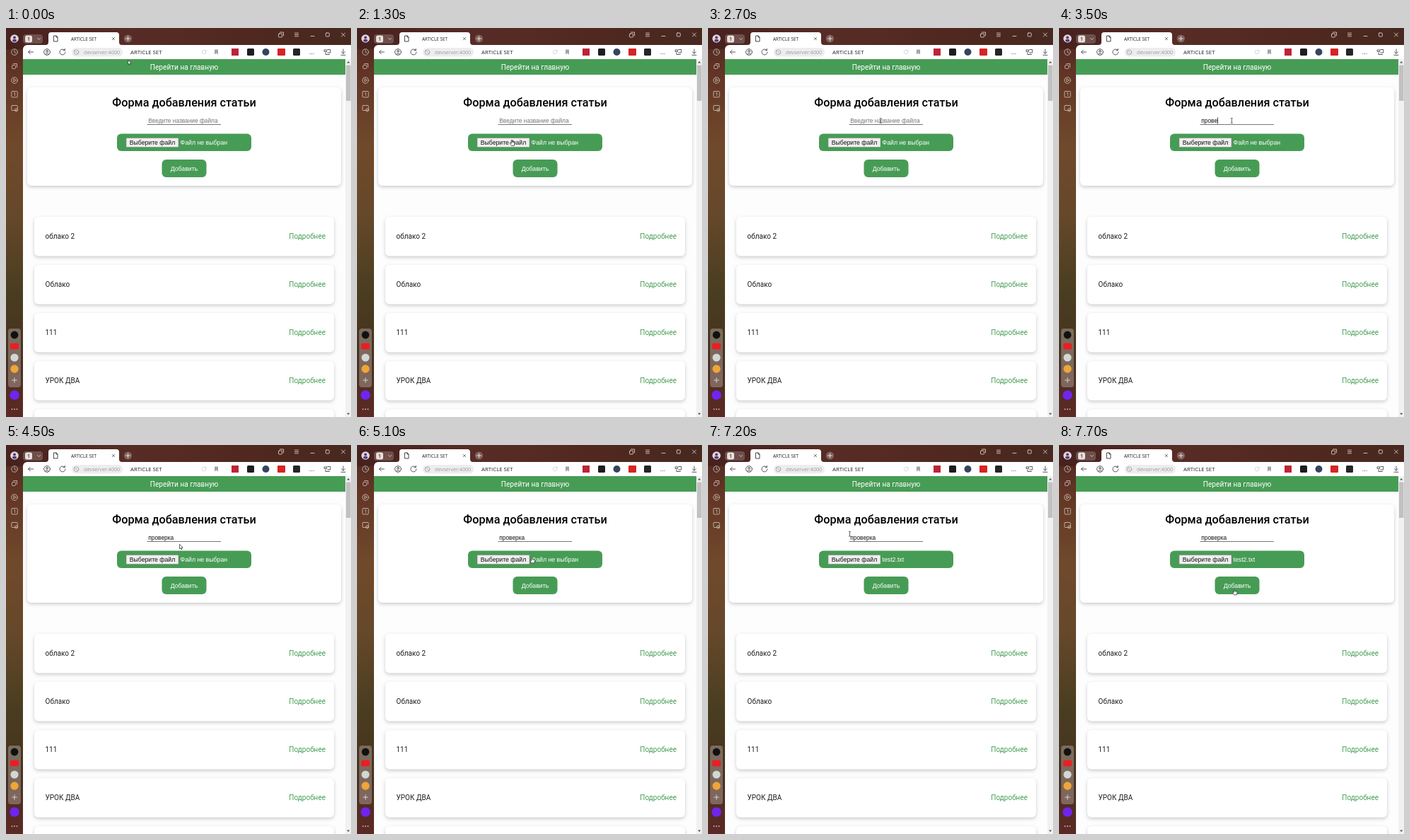
These frames come from a looping animation (488 px wide and 550 px high, 8 s). An HTML page:

```html
<!DOCTYPE html>
<html lang="ru">
<head>
<meta charset="utf-8">
<title>Форма</title>
<style>
  html, body { margin: 0; width: 100%; height: 100%; overflow: hidden; background: #fdfdfd; }
  svg { display: block; }
  text { white-space: pre; }
  .roboto { font-family: Roboto, sans-serif; }
  .arial { font-family: "Liberation Sans", Arial, sans-serif; }
  .ui { font-family: "Open Sans", sans-serif; }
  .line { fill: none; stroke-width: .9; stroke-linecap: round; stroke-linejoin: round; }
  .card { fill: #fff; filter: drop-shadow(0 2.5px 2.5px rgba(40, 45, 65, .24)); }
</style>
</head>
<body>
<svg id="stage" width="488" height="550" viewBox="0 0 488 550">
  <defs>
    <linearGradient id="side" x2="0" y2="1">
      <stop offset="0" stop-color="#4c2521"/>
      <stop offset=".12" stop-color="#623525"/>
      <stop offset=".3" stop-color="#70492b"/>
      <stop offset=".48" stop-color="#66482a"/>
      <stop offset=".68" stop-color="#493d20"/>
      <stop offset=".86" stop-color="#48301f"/>
      <stop offset="1" stop-color="#5c2924"/>
    </linearGradient>
    <linearGradient id="top">
      <stop offset="0" stop-color="#46211e"/>
      <stop offset=".35" stop-color="#582c26"/>
      <stop offset=".7" stop-color="#50281f"/>
      <stop offset="1" stop-color="#47291f"/>
    </linearGradient>
  </defs>
  <g id="scene"></g>
  <g id="field"></g>
  <rect id="caret" y="126.5" width=".8" height="9" fill="#111"/>
  <g id="cursor" stroke="#222" stroke-width=".7" stroke-linejoin="round">
    <path data-shape="arrow" fill="#fff" d="M0 0V6.6L1.5 5.2 2.5 7.5 3.6 7 2.6 4.8H4.7Z"/>
    <path data-shape="hand" fill="#fff" d="M-.7 .6Q0-.4 .7.6V3.2L3.6 3.9Q4.2 4.2 4 5.2L3.3 8.4H-.5L-2.7 5.2Q-2.6 4-1.6 4.6L-.7 5.3Z"/>
    <path data-shape="beam" fill="none" d="M-1.5-3.4H-.4L0-3 .4-3.4H1.5M0-3V3M-1.5 3.4H-.4L0 3 .4 3.4H1.5"/>
  </g>
</svg>
<script>
const GREEN = '#479c55';
const LOOP = 8000, STEP = 100;
const $ = id => document.getElementById(id);

const rect = (x, y, w, h, fill, r = 0, more = '') =>
  `<rect x="${x}" y="${y}" width="${w}" height="${h}" rx="${r}" fill="${fill}" ${more}/>`;
const dot = (x, y, r, fill) => `<circle cx="${x}" cy="${y}" r="${r}" fill="${fill}"/>`;
const line = (d, color) => `<path class="line" d="${d}" stroke="${color}"/>`;
const ring = (x, y, r, color) => `<circle class="line" cx="${x}" cy="${y}" r="${r}" stroke="${color}"/>`;
const frame = (x, y, w, h, color) =>
  `<rect class="line" x="${x}" y="${y}" width="${w}" height="${h}" rx="1" stroke="${color}"/>`;
const label = (str, x, mid, size, fill, font, anchor = 'start', weight = 400) =>
  `<text class="${font}" x="${x}" y="${mid + size * .355}" font-size="${size}" fill="${fill}" text-anchor="${anchor}" font-weight="${weight}">${str}</text>`;
const card = (x, y, w, h) => `<rect class="card" x="${x}" y="${y}" width="${w}" height="${h}" rx="6"/>`;
const copyIcon = (x, y, c) => frame(x - 3.5, y - 1.5, 5, 5, c) + line(`M${x - 1.5} ${y - 3.5}h5v5`, c);

function sidebar() {
  const c = '#c9b8ae';
  return rect(0, 0, 24, 550, 'url(#side)') + rect(0, 0, 488, 30, 'url(#top)') +
    dot(12, 15, 5.8, '#e6d5df') + dot(12, 13.6, 2, '#4d3d73') + rect(9, 16, 6, 3.5, '#4d3d73', 1.7) +
    ring(12, 34, 4.3, c) + line('M12 31.5V34.3L14 35.3', c) +
    copyIcon(12, 54, c) +
    ring(12, 74, 4.3, c) + line('M10.8 72V76L14 74Z', c) +
    frame(7.8, 89.5, 8.4, 8.4, c) + label('1', 12, 93.8, 6.5, '#eee', 'ui', 'middle') +
    frame(7.8, 109.5, 8.4, 7, c) + ring(14.5, 116, 2, c) +
    rect(3, 425, 18, 83, 'rgba(255,255,255,.27)', 4) +
    dot(12, 434, 5.4, '#111') + rect(6, 445.8, 12, 8.4, '#ed1c24', 2) +
    dot(12, 466, 5.6, '#d4d6d4') + dot(12, 482, 5.7, '#f0a536') +
    line('M8.7 498h6.6M12 494.7v6.6', '#ddd') +
    dot(12, 519, 6.8, '#6f25ee') +
    [8.5, 12, 15.5].map(x => dot(x, 539, .9, '#ccb9b1')).join('');
}

function tabs() {
  const c = '#d9cbc6';
  return rect(24, 9, 28, 13, 'rgba(255,255,255,.2)', 4) +
    rect(27, 10.5, 10, 10, '#e8dfdc', 2.5) + label('1', 32, 15.4, 7, '#4a2a26', 'ui', 'middle', 600) +
    line('M44.5 14.5L46.5 16.5 48.5 14.5', c) +
    '<path d="M24 30a6 6 0 0 1 6-6H56Q60 24 60 20V10Q60 6 64 6H156Q160 6 160 10V20Q160 24 164 24H488V44H24Z" fill="#fff"/>' +
    line('M67.8 11h3.2l2 2v6h-5.2ZM71 11v2h2', '#333') +
    label('ARTICLE SET', 92, 15.3, 6.3, '#222', 'ui') +
    line('M150.2 13.4l3.4 3.4M153.6 13.4l-3.4 3.4', '#666') +
    dot(172.5, 15, 5.6, 'rgba(255,255,255,.25)') + line('M169.6 15h5.8M172.5 12.1v5.8', '#eee') +
    copyIcon(389, 9.5, c) + line('M408.5 7.2h5M408.5 9.5h5M408.5 11.8h5', c) +
    line('M431 11.5h5', c) + frame(452.3, 7, 5, 5, c) + line('M474.5 7l5 5M479.5 7l-5 5', c);
}

function toolbar() {
  const c = '#444';
  return line('M38.5 34h-7M34.3 31.2L31.5 34l2.8 2.8', c) +
    ring(58, 34, 4.4, c) + ring(58, 32.8, 1.4, c) + line('M55.5 37q2.5-2.6 5 0', c) +
    line('M83 31.3A4 4 0 1 0 84 34M83.3 29.4v2.3H81', c) +
    rect(93, 28, 72, 12.5, '#ededed', 6) +
    ring(99.5, 34.2, 3.4, '#a5a5a5') + line('M97.2 32l4.6 4.6', '#a5a5a5') +
    label('devserver:4000', 110, 34.2, 7.2, '#999', 'ui') +
    label('ARTICLE SET', 176, 34.2, 7.8, '#222', 'ui') +
    ring(280, 34, 2.8, '#d5d5d5') + line('M282 31.5h2', '#d5d5d5') +
    '<path d="M295 30.6h5v7l-2.5-2-2.5 2Z" fill="#a2a2a8"/>' +
    rect(319, 29, 10, 10, '#bd2436') + rect(341, 29, 10, 10, '#1d1d1d', 1.5) +
    dot(367.5, 34, 5, '#35445f') + rect(384, 29, 11, 10, '#d72424', 1) +
    rect(406, 29, 10, 10, '#252525', 1.5) +
    [430, 432.5, 435].map(x => dot(x, 36.5, .6, c)).join('') +
    line('M450.5 31h3.2v2.4h-3.2ZM454.8 30.5h4v4.5h-4M452 35v2.5h5.5', c) +
    line('M477 30v6M474.5 33.7l2.5 2.5 2.5-2.5M474 38.3h6', c);
}

function page() {
  const titles = ['облако 2', 'Облако', '111', 'УРОК ДВА', ''];
  const rows = titles.map((title, i) => {
    const y = 267 + i * 68, link = title ? 'Подробнее' : '';
    return card(40, y, 424, 55.5) + label(title, 55.5, y + 27.5, 10, '#1c1c1c', 'roboto') +
      label(link, 452, y + 27.5, 10, GREEN, 'roboto', 'end');
  }).join('');
  return rect(24, 44, 464, 506, '#fdfdfd') + rect(24, 44, 456, 22, GREEN) +
    label('Перейти на главную', 252, 55.3, 10.1, '#fff', 'roboto', 'middle') +
    card(30, 84, 444, 139) +
    label('Форма добавления статьи', 252, 105, 16.2, '#000', 'roboto', 'middle', 500) +
    rect(199.5, 136, 104.5, .8, '#555') +
    rect(157, 149.5, 190, 24.5, GREEN, 6) +
    rect(170, 155.5, 74, 13, '#efefef', 1, 'stroke="#888" stroke-width=".6"') +
    label('Выберите файл', 207, 162, 8.7, '#111', 'arial', 'middle') +
    rect(220.5, 186, 63, 25, GREEN, 6) +
    label('Добавить', 252, 198.6, 8.75, '#fff', 'arial', 'middle') + rows +
    rect(480, 44, 8, 506, '#f1f1f1') + rect(481, 52.5, 6.5, 50.5, '#c1c1c1') +
    '<path d="M482 49.5l2.2-2.6 2.2 2.6ZM482 544.5l2.2 2.6 2.2-2.6Z" fill="#555"/>';
}

$('scene').innerHTML = sidebar() + tabs() + toolbar() + page();
$('field').innerHTML = label('', 201.3, 131, 8.33, '#111', 'arial') + label('', 246.5, 162, 8.75, '#fff', 'arial');
const [nameText, fileText] = $('field').children;

// Pointer path: time, x, y
const path = [
  [0, 172.7, 45.2], [500, 212, 118], [600, 212, 118], [1300, 219, 158], [1500, 221, 160],
  [2100, 244.3, 131], [4300, 244.3, 131], [4900, 248, 159], [5000, 248, 159], [5100, 247.5, 158.5],
  [5300, 247, 158.5], [5400, 248, 159], [5600, 248, 159], [6100, 172, 79], [6900, 172, 79],
  [7700, 248, 203.5], [LOOP, 248, 203.5]
];
const zones = [
  ['beam', 199, 125, 304, 137], ['beam', 151, 96, 353, 114],
  ['hand', 157, 149, 347, 174], ['hand', 220, 186, 284, 211], ['hand', 204, 48, 299, 62]
];
const word = 'проверка';
const keyTimes = [3100, 3200, 3300, 3400, 3500, 3600, 3800, 3900];

function pointer(t) {
  const i = Math.max(1, path.findIndex(p => p[0] >= t));
  const [t0, x0, y0] = path[i - 1], [t1, x1, y1] = path[i];
  const k = (t - t0) / (t1 - t0);
  return [x0 + (x1 - x0) * k, y0 + (y1 - y0) * k];
}

function draw() {
  const t = Math.floor(performance.now() % LOOP / STEP) * STEP;
  const [x, y] = pointer(t);
  const zone = zones.find(([, l, top, r, b]) => x >= l && x <= r && y >= top && y <= b);
  const shape = zone ? zone[0] : 'arrow';
  $('cursor').setAttribute('transform', `translate(${x} ${y})`);
  for (const el of $('cursor').children)
    el.style.display = el.dataset.shape === shape ? '' : 'none';

  const typed = word.slice(0, keyTimes.filter(k => t >= k).length);
  nameText.textContent = typed || 'Введите название файла';
  nameText.setAttribute('fill', typed ? '#111' : '#757575');
  fileText.textContent = t >= 7000 ? 'test2.txt' : 'Файл не выбран';

  const caretOn = (t >= 2100 && t < 2700) || (t >= 3000 && t < 4400);
  $('caret').style.display = caretOn ? '' : 'none';
  $('caret').setAttribute('x', 201.3 + (typed ? nameText.getComputedTextLength() : 0));
  requestAnimationFrame(draw);
}
draw();
</script>
</body>
</html>
```
